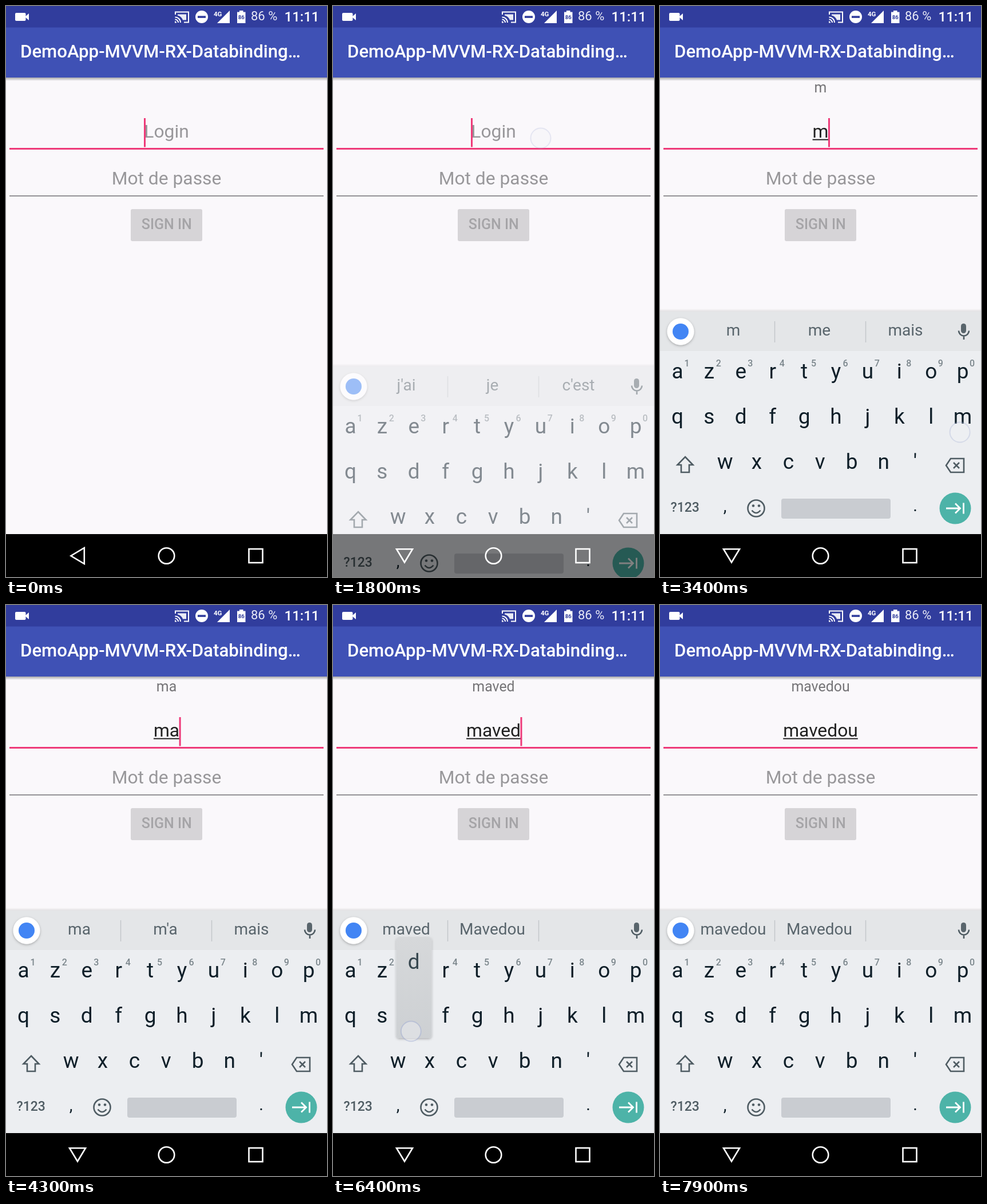
Write an HTML page that moves like this. It is 561x998 px and loops after 8000 ms.

```html
<!DOCTYPE html>
<html lang="fr">
<head>
<meta charset="utf-8">
<title>Login demo</title>
<style>
  html, body { margin: 0; width: 100%; height: 100%; overflow: hidden; background: #faf8fb; }
  svg { display: block; width: 100vw; height: 100vh; font-family: Roboto, "Noto Sans", sans-serif; }
  .mid { text-anchor: middle; }
  .bold { font-weight: 500; }
  .line { fill: none; stroke: #4f5c63; stroke-width: 2.6; }
  .nav { fill: none; stroke: #fff; stroke-width: 2.6; }
  .field { font-size: 31.8px; }
  .hint { fill: #98979a; }
  .key { font-size: 37px; fill: #0f1f29; }
  .digit { font-size: 16px; fill: #7b868c; }
  .word { font-size: 28px; fill: #59656c; }
</style>
</head>
<body>
<svg viewBox="0 0 561 998" preserveAspectRatio="none">
  <defs>
    <linearGradient id="barShade" x2="0" y2="1">
      <stop offset="0" stop-color="#000" stop-opacity=".32"/>
      <stop offset="1" stop-color="#000" stop-opacity="0"/>
    </linearGradient>
    <linearGradient id="kbShade" x2="0" y2="1">
      <stop offset="0" stop-color="#000" stop-opacity="0"/>
      <stop offset="1" stop-color="#000" stop-opacity=".1"/>
    </linearGradient>
    <linearGradient id="popFill" x2="0" y2="1">
      <stop offset="0" stop-color="#d6d8da"/>
      <stop offset="1" stop-color="#cdd0d3"/>
    </linearGradient>
    <filter id="soft" x="-30%" y="-30%" width="160%" height="160%">
      <feDropShadow dx="0" dy="1.5" stdDeviation="2" flood-opacity=".28"/>
    </filter>
  </defs>

  <!-- form -->
  <rect width="561" height="998" fill="#faf8fb"/>
  <text id="label" class="mid" x="280.5" y="151" font-size="24.9" fill="#757477"></text>
  <text id="login" class="mid field" x="280.5" y="230"></text>
  <rect id="under" y="232.6" height="2" fill="#222"/>
  <rect x="6" y="248" width="549" height="3" fill="#ee3a79"/>
  <rect id="caret" y="196" width="3" height="50.5" fill="#ee3a79"/>
  <text class="mid field hint" x="280.5" y="312">Mot de passe</text>
  <rect x="6" y="331.2" width="549" height="1.5" fill="#727174"/>
  <rect x="218" y="355" width="125" height="56" rx="3" fill="#d6d4d7"/>
  <text class="mid bold" x="280.8" y="390" font-size="25" fill="#a5a4a7">SIGN IN</text>

  <!-- app bar -->
  <rect y="125" width="561" height="6" fill="url(#barShade)"/>
  <rect y="37" width="561" height="88" fill="#3f51b5"/>
  <text class="bold" x="25" y="90" font-size="31.2" fill="#fff">DemoApp-MVVM-RX-Databinding…</text>

  <!-- status bar -->
  <rect width="561" height="37.5" fill="#313d9d"/>
  <g fill="#fff">
    <rect x="16" y="12" width="18.5" height="14" rx="2"/>
    <path d="M33 19L40 13V25Z"/>
    <path d="M296 15V10.5H319V28.5H311M295.5 19.5A9.5 9.5 0 0 1 305 29M295.5 23.5A5.5 5.5 0 0 1 301 29" fill="none" stroke="#fff" stroke-width="2"/>
    <path d="M300 14.5H315V24.5H309A13 13 0 0 0 300 16.5Z" opacity=".9"/>
    <path d="M295 26.5A2.8 2.8 0 0 1 298 29.5H295Z"/>
    <circle cx="342" cy="19" r="11"/>
    <rect x="335" y="17.3" width="14" height="3.6" fill="#313d9d"/>
    <text x="363" y="17.5" font-size="11.5" font-weight="700">4G</text>
    <path d="M391 8V30H369Z"/>
    <path id="data" d="M379.5 21.5H386.5L383 27.5Z" fill="#3c3f70"/>
    <path d="M408 8H414.5V10.5H418.5V30H404V10.5H408Z"/>
    <text class="mid" x="411.2" y="23" font-size="9.5" font-weight="700" fill="#313d9d">86</text>
    <text x="428" y="25" font-size="22" fill="#e8eaf6">86 %</text>
    <text class="bold" x="486.5" y="26.5" font-size="24">11:11</text>
  </g>

  <rect y="923" width="561" height="75"/>

  <!-- keyboard -->
  <g id="board">
    <rect y="529" width="561" height="5" fill="url(#kbShade)"/>
    <rect y="534" width="561" height="389" fill="#eceef1"/>
    <rect y="534" width="561" height="69" fill="#e4e6e8"/>
    <circle cx="36" cy="569" r="23.5" fill="#fff" filter="url(#soft)"/>
    <circle cx="36" cy="569" r="14" fill="#4285f4"/>
    <path d="M200.5 551V588M359.5 551V588" stroke="#c3c7ca" stroke-width="1.5"/>
    <g id="words"></g>
    <rect x="526" y="555" width="9" height="17" rx="4.5" fill="#59656c"/>
    <path d="M522 567.5A9 9 0 0 0 540 567.5M531 577V583" class="line"/>
    <g id="keys"></g>
    <path class="line" d="M44 788L57.5 802H51V815H37V802H30.5Z"/>
    <path class="line" d="M508 791H531V815H508L500 803ZM513 798L523 808M523 798L513 808"/>
    <text class="bold" x="18.5" y="884" font-size="23" fill="#4f5c63">?123</text>
    <text class="mid" x="113.5" y="884" font-size="29" fill="#0f1f29">,</text>
    <circle class="line" cx="168" cy="878" r="14.5"/>
    <circle cx="163" cy="873.5" r="2.3" fill="#4f5c63"/>
    <circle cx="173" cy="873.5" r="2.3" fill="#4f5c63"/>
    <path class="line" d="M160.5 881.5Q168 890.5 175.5 881.5"/>
    <rect x="212" y="861" width="191" height="35" rx="4" fill="#c9ccd1"/>
    <text class="mid" x="446" y="883" font-size="29" fill="#0f1f29">.</text>
    <circle cx="516" cy="878" r="27.5" fill="#4db3a8"/>
    <path d="M500 878H524M516 869.5L524.5 878L516 886.5M530.5 868.5V887.5" fill="none" stroke="#fff" stroke-width="2.8"/>
  </g>

  <!-- navigation -->
  <path id="back" class="nav" d="M111 949.2H139L125 972.5Z"/>
  <circle class="nav" cx="280.5" cy="961" r="13.8"/>
  <rect class="nav" x="424.5" y="949" width="24" height="24"/>

  <!-- pressed key and finger -->
  <g id="popup">
    <rect x="-30.5" y="-149" width="61.5" height="176" rx="5" fill="url(#popFill)" filter="url(#soft)"/>
    <text id="popKey" class="mid" y="-94" font-size="37" fill="#37474f"></text>
    <text id="popMore" class="mid" x="15.5" y="-76" font-size="19" fill="#37474f">…</text>
  </g>
  <circle id="touch" r="17.5" fill="#f1f3f6" fill-opacity=".85" stroke="#a6b1d6" stroke-width="2"/>
</svg>

<script>
const LOOP = 8000, STEP = 100, MID = 280.5;
const NAME = "mavedou";
const PROPER = "Mavedou";
const ROWS = ["azertyuiop", "qsdfghjklm", "wxcvbn'"];
const SUGGESTIONS = [
  ["j'ai", "je", "c'est"], ["m", "me", "mais"], ["ma", "m'a", "mais"],
  ["mav", "Mav", PROPER], ["mave", "Mave", PROPER],
  ["maved", PROPER, ""], ["mavedo", PROPER, ""], [NAME, PROPER, ""]
];
const TAP = 1600;
// press time and the moment the finger mark is gone
const PRESSES = [[3200, 3500], [4000, 4300], [4600, 4900], [5400, 5600],
                 [6300, 6500], [6600, 6800], [7300, 7600]];
// keyboard entrance from 1700 ms: [offset, opacity] per step
const ENTER = [[165, .15], [96, .5], [42, .8], [10, .95]];

const $ = id => document.getElementById(id);
const show = (el, on) => el.setAttribute("visibility", on ? "visible" : "hidden");
const move = (el, x, y) => el.setAttribute("transform", `translate(${x} ${y})`);

function addText(parent, cls, x, y, text) {
  const el = document.createElementNS("http://www.w3.org/2000/svg", "text");
  el.setAttribute("class", cls);
  el.setAttribute("x", x);
  el.setAttribute("y", y);
  el.textContent = text;
  parent.append(el);
  return el;
}

const spots = {};
ROWS.forEach((row, r) => [...row].forEach((ch, i) => {
  const x = 30.5 + 55.4 * (r === 2 ? i + 1.5 : i), y = 651 + 79 * r;
  spots[ch] = [x, y];
  addText($("keys"), "mid key", x, y, ch);
  if (r === 0) addText($("keys"), "mid digit bold", x + 16.5, y - 21, (i + 1) % 10);
}));
const words = [128, 278.5, 429].map(x => addText($("words"), "mid word", x, 576, ""));

function drawForm(t) {
  const count = PRESSES.filter(([down]) => t >= down + 100).length;
  const typed = NAME.slice(0, count), login = $("login");
  $("label").textContent = typed;
  login.textContent = typed || "Login";
  login.setAttribute("fill", count ? "#212121" : "#98979a");
  const w = login.getComputedTextLength(), left = MID - w / 2;
  show($("under"), count > 0);
  $("under").setAttribute("x", left);
  $("under").setAttribute("width", w);

  // blinking restarts with each edit
  const resets = [-400, TAP, ...PRESSES.map(([down]) => down + 100)];
  const last = resets.filter(r => r <= t).pop();
  show($("caret"), Math.floor((t - last) / 500) % 2 === 0);
  $("caret").setAttribute("x", count ? left + w - .5 : left - .3);
  words.forEach((el, i) => el.textContent = SUGGESTIONS[count][i]);
}

function drawBoard(t) {
  const step = (t - 1700) / STEP;
  const [dy, alpha] = step < 0 ? [400, 0] : ENTER[step] || [0, 1];
  move($("board"), 0, dy);
  $("board").setAttribute("opacity", alpha);
  const turn = step < 0 ? 90 : step < 1 ? 45 : 0;
  $("back").setAttribute("transform", `rotate(${turn} 125 961)`);
}

function drawTouch(t) {
  const i = PRESSES.findIndex(([down, up]) => t >= down && t < up);
  const touch = $("touch");
  const popped = i >= 0 && t < PRESSES[i][0] + 200;
  let alpha = 0;
  show($("popup"), popped);
  show($("popMore"), popped && "aeou".includes(NAME[i]));
  if (i >= 0) {
    const [down, up] = PRESSES[i], [x, y] = spots[NAME[i]];
    move($("popup"), x, y);
    $("popKey").textContent = NAME[i];
    move(touch, x - 5, y + 15);
    alpha = 1 - (t - down) / (up - down);
  } else if (t >= TAP && t < TAP + 300) {
    move(touch, 363, 231);
    alpha = 1 - (t - TAP) / 270;
  }
  touch.setAttribute("opacity", alpha);
}

function frame() {
  const t = Math.floor(performance.now() % LOOP / STEP) * STEP;
  drawForm(t);
  drawBoard(t);
  drawTouch(t);
  show($("data"), t >= 6700 && t < 7300);
  requestAnimationFrame(frame);
}
frame();
</script>
</body>
</html>
```
